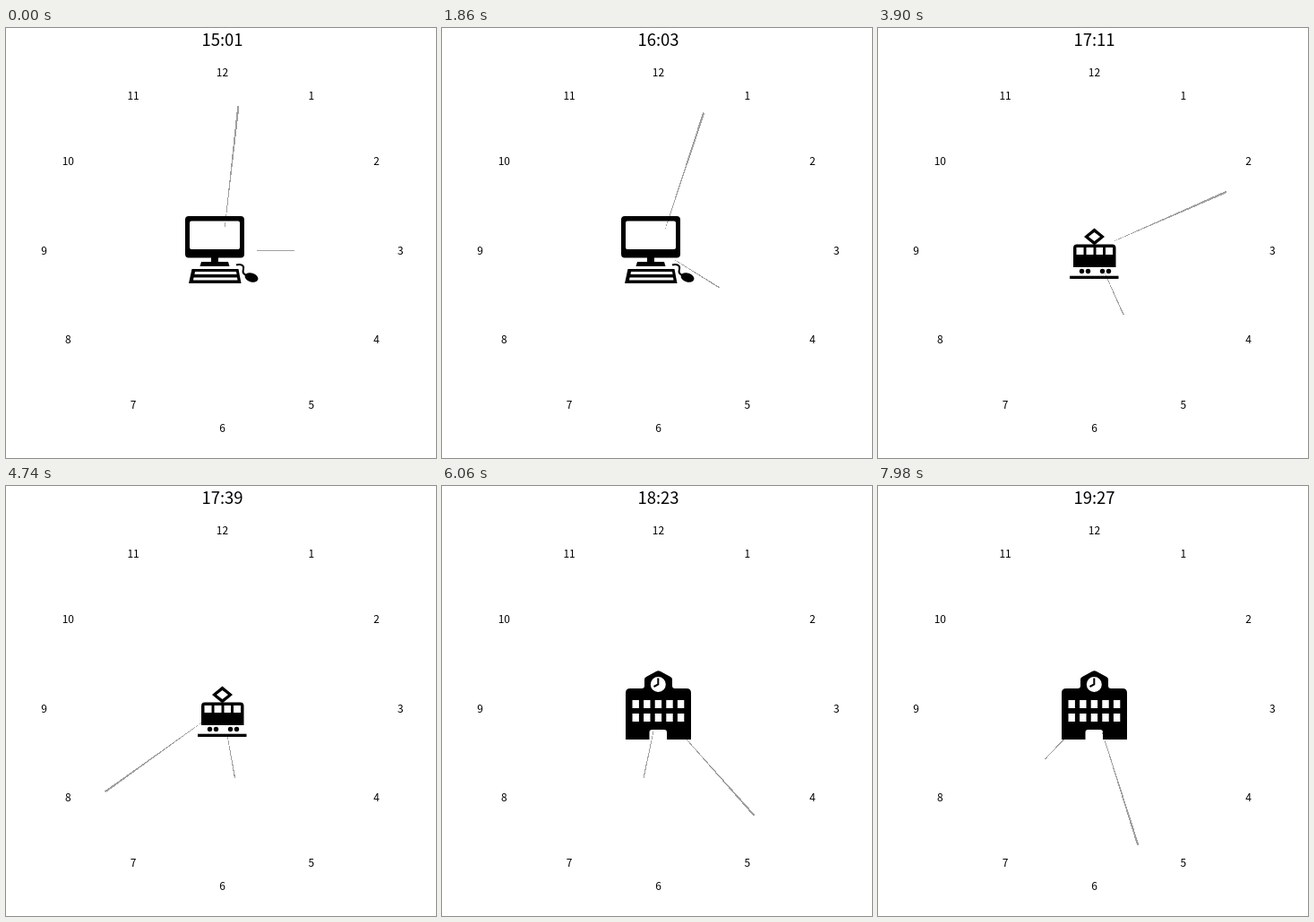
These frames come from a looping animation (480x480 px, 8000 ms). An HTML page:

```html
<!DOCTYPE html>
<html lang="en">
<head>
<meta charset="utf-8">
<title>Clock</title>
<style>
html, body { margin: 0; width: 100%; height: 100%; overflow: hidden; background: #fff; }
svg { display: block; width: 100vw; height: 100vh; }
text { font-family: "Noto Sans CJK SC", "Noto Sans CJK JP", "Noto Sans CJK", "DejaVu Sans", sans-serif; font-size: 12px; font-weight: 500; text-anchor: middle; }
#time { font-size: 18.5px; font-weight: 400; }
.icon { visibility: hidden; fill-rule: evenodd; }
</style>
</head>
<body>
<svg viewBox="0 0 480 480">
  <!-- Hard-edged hands: a pixel is grey once a third of it is covered. -->
  <filter id="hardEdge" filterUnits="userSpaceOnUse" x="0" y="0" width="480" height="480">
    <feComponentTransfer><feFuncA type="discrete" tableValues="0 1 1"/></feComponentTransfer>
  </filter>
  <g fill="#a0a0a0" filter="url(#hardEdge)">
    <polygon id="hourHand"/>
    <polygon id="minuteHand"/>
  </g>

  <g class="icon" id="computer">
    <path d="M204 210H262Q266 210 266 214V252.500Q266 256.500 262 256.500H204Q200 256.500 200 252.500V214Q200 210 204 210Z
      M207 215.500Q205 215.500 205 217.500V245Q205 247 207 247H259Q261 247 261 245V217.500Q261 215.500 259 215.500Z"/>
    <path d="M229 256H237V261H248L249.500 266H216.500L218 261H229Z"/>
    <path d="M207.500 269H259.500L262.500 285H204Z M211 272L210.500 275H257.500L257 272Z M209.500 278.500L209 281.500H258.500L258 278.500Z"/>
    <path d="M257 264.500C262 263 266 265 265 269C264 273 264.500 274 268 276" fill="none" stroke="#000" stroke-width="2"/>
    <ellipse cx="274" cy="278.500" rx="7.600" ry="5" transform="rotate(17 274 278.500)"/>
  </g>

  <g class="icon" id="tram">
    <path d="M230 233L241.500 223.500L253 233L241.500 242.500Z M235 233L241.500 238L248 233L241.500 228Z"/>
    <path d="M222 241.500H261.500Q265.500 241.500 265.500 245.500V267H218V245.500Q218 241.500 222 241.500Z
      M221.500 245V253H229.500V245Z M232.500 245V253H240.500V245Z M243.500 245V253H251V245Z M254 245V253H262V245Z"/>
    <g id="wheels"></g>
    <rect x="214" y="276.700" width="54.500" height="3.300"/>
  </g>

  <g class="icon" id="school">
    <path id="building"/>
    <path d="M241.300 214.500V221.500L236.500 224" fill="none" stroke="#000" stroke-width="2"/>
  </g>

  <g id="numbers"></g>
  <text id="time" x="241.500" y="20"></text>
</svg>
<script>
const LOOP = 8000, STEP = 30, START = 15 * 60 + 1;
const CX = 241.5, CY = 247.5, WEDGE = 0.7;
const $ = id => document.getElementById(id);

function add(parent, tag, attrs, label = '') {
  const el = document.createElementNS('http://www.w3.org/2000/svg', tag);
  for (const key in attrs) el.setAttribute(key, attrs[key]);
  el.textContent = label;
  parent.append(el);
}

function polar(degrees, radius, x = CX, y = CY) {
  const a = degrees * Math.PI / 180;
  return [x + radius * Math.sin(a), y - radius * Math.cos(a)];
}

for (let n = 1; n <= 12; n++) {
  const [x, y] = polar(n * 30, 198.8, 241.5, 248);
  add($('numbers'), 'text', { x, y: y + 4.5 }, n);
}

for (const cx of [227.5, 234.5, 250.5, 257.5]) {
  add($('wheels'), 'circle', { cx, cy: 271.5, r: 2.7 });
}

let windows = '';
for (const y of [239, 254])
  for (let i = 0; i < 5; i++) windows += `M${212.5 + i * 12.6} ${y}h7.4v9h-7.4Z`;
$('building').setAttribute('d',
  'M205 283V231Q205 226 210 226H223Q226 226 226 223V216Q226 214 228 213L239 207' +
  'Q241.500 205.500 244 207L255 213Q257 214 257 216V223Q257 226 260 226H273Q278 226 278 231V283' +
  'H251V275Q251 272 248 272H234.500Q231.500 272 231.500 275V283Z' +
  'M232.800 221.500a8.500 8.500 0 1 0 17 0a8.500 8.500 0 1 0 -17 0Z' + windows);

function setHand(hand, angle, length) {
  const points = [[CX, CY], polar(angle, length), polar(angle + WEDGE, length)];
  hand.setAttribute('points', points.join(' '));
}

function draw(now) {
  const total = START + Math.floor(now % LOOP / STEP);
  const hour = Math.floor(total / 60), minute = total % 60;
  $('time').textContent = `${hour}:${String(minute).padStart(2, '0')}`;
  setHand($('minuteHand'), minute * 6, 160.8);
  setHand($('hourHand'), total / 2, 80);
  const shown = hour < 17 ? 'computer' : hour < 18 ? 'tram' : 'school';
  for (const id of ['computer', 'tram', 'school']) {
    $(id).style.visibility = id === shown ? 'visible' : 'hidden';
  }
}

function tick() {
  draw(performance.now());
  requestAnimationFrame(tick);
}
tick();
</script>
</body>
</html>
```
